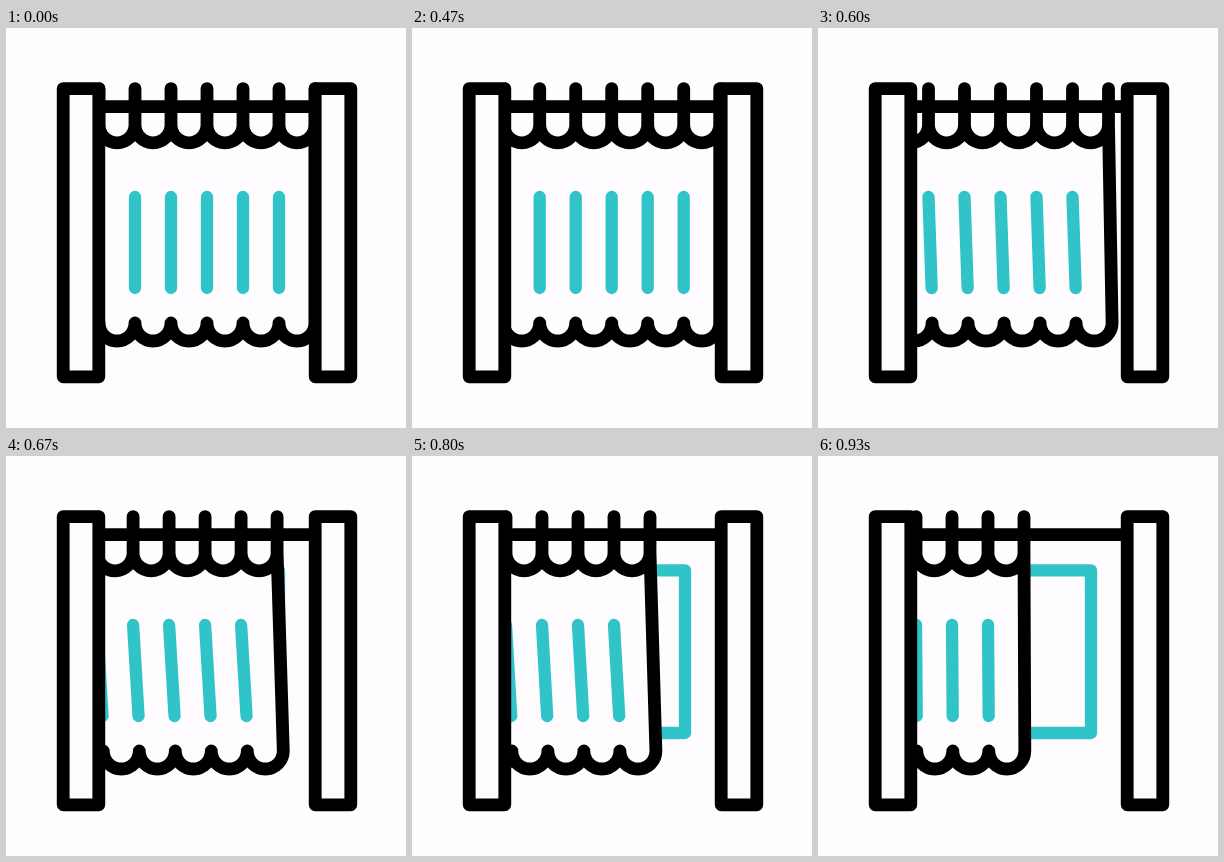
Recreate the animation shown at these times as an HTML page. Size 400 by 400 pixels, loop 1 s.

```html
<!DOCTYPE html>
<html lang="en">
<head>
<meta charset="utf-8">
<title>Curtain</title>
<style>
  html, body { margin: 0; height: 100%; overflow: hidden; background: #fefcfe; }
  svg { display: block; width: 100vw; height: 100vh; }
  path, rect { fill: none; stroke: #000; stroke-width: 12.8; stroke-linecap: round; stroke-linejoin: round; }
  .solid { fill: #fefcfe; }
  .teal { stroke: #30c4c9; stroke-width: 12.3; }
  #cloth { fill: #fefcfe; stroke: none; }
</style>
</head>
<body>
<svg viewBox="0 0 400 400">
  <clipPath id="right"><path d="M93 0H400V400H93z"/></clipPath>
  <rect class="teal" x="129" y="114.3" width="144" height="162.7"/>
  <path d="M93 78.6H309"/>
  <g clip-path="url(#right)">
    <path id="cloth"/>
    <path id="stripes" class="teal"/>
    <path id="lines"/>
  </g>
  <rect class="solid" x="57.2" y="60.6" width="35.6" height="288.2"/>
  <rect class="solid" x="309.2" y="60.6" width="35.6" height="288.2"/>
</svg>
<script>
const LOOP = 1000, FPS = 15, GAP = 36;
const LEFT = 93, EDGE = 309, FOLDS = 6;
const RING_Y = 60.6, TOP_Y = 96.8, HEM_Y = 295;

// [time, value] pairs: slide of the rings, and how far the hem trails behind
const slide = [[400, 0], [467, -1.3], [533, -7], [600, -18.5], [667, -38], [800, -71], [933, -103]];
const trail = [[467, 0], [533, 1.5], [600, 3.6], [667, 6.2], [800, 5.9], [933, 0.8]];

const cloth = document.getElementById('cloth');
const stripes = document.getElementById('stripes');
const lines = document.getElementById('lines');

function at(keys, t) {
  if (t <= keys[0][0]) return keys[0][1];
  for (let i = 1; i < keys.length; i++) {
    const [t0, a] = keys[i - 1], [t1, b] = keys[i];
    if (t <= t1) return a + (b - a) * (t - t0) / (t1 - t0);
  }
  return keys[keys.length - 1][1];
}

const scallops = (x, y) => `M${x} ${y}` + `a18 18 0 0 0 ${GAP} 0`.repeat(FOLDS);

function draw(t) {
  const top = at(slide, t), lag = at(trail, t), hem = top + lag;
  let hooks = '', bars = '';
  for (let i = 0; i <= FOLDS; i++) {
    const x = LEFT + GAP * i;
    hooks += `M${x + top} ${RING_Y}V${TOP_Y}`;
    if (i > 0 && i < FOLDS) bars += `M${x + top} 169L${x + top + lag * 0.88} 260`;
  }
  cloth.setAttribute('d', scallops(LEFT + hem, HEM_Y) + `L${EDGE + top} ${TOP_Y}H${LEFT + top}z`);
  stripes.setAttribute('d', bars);
  lines.setAttribute('d', hooks + scallops(LEFT + top, TOP_Y) + scallops(LEFT + hem, HEM_Y) +
    `M${EDGE + top} ${TOP_Y}L${EDGE + hem} ${HEM_Y}`);
}

function tick() {
  const step = Math.floor((performance.now() % LOOP + 4) * FPS / 1000) % FPS;
  draw(step * 1000 / FPS);
  requestAnimationFrame(tick);
}
tick();
</script>
</body>
</html>
```
